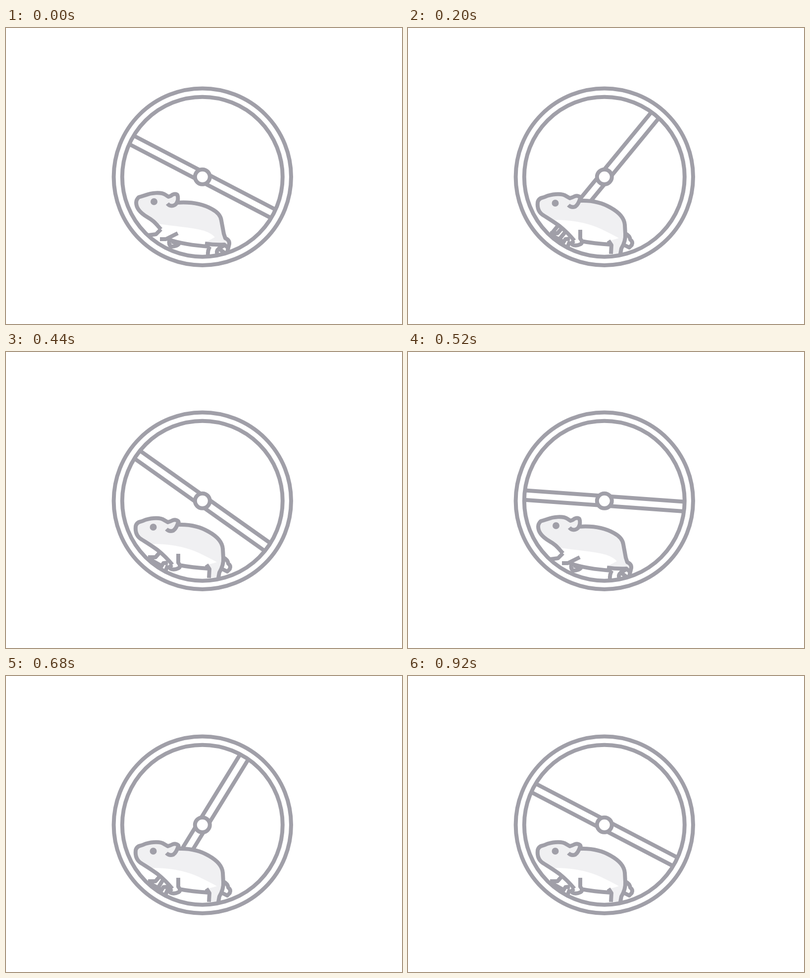
An HTML page with a canvas that plays this animation: 800 px wide and 600 px high, repeating every 0.96 s.

```html
<!DOCTYPE html>
<html lang="en">
<head>
<meta charset="utf-8">
<title>Hamster wheel</title>
<style>
  html, body { margin: 0; width: 100%; height: 100%; overflow: hidden; background: #fff; }
  canvas { display: block; }
</style>
</head>
<body>
<canvas id="stage" width="800" height="600"></canvas>
<script>
const ctx = document.getElementById('stage').getContext('2d');
const LINE = '#a09fa8', FUR = '#f0f0f2', WHITE = '#fff';
const HUB = { x: 396.8, y: 301.7 };
const STEP_MS = 40, STEPS = 24, TURN_STEPS = 23, POSE_STEPS = 2;

// outline: chin, head, ear, back and rump; base closes it for the fill
const stretched = {
  eye: [299, 352],
  outline: `M313 408C302 396 299 391 285 383C270 374 263 364 263 354Q263 348 268 343
    Q275 341 281 339C294 334 313 332 322 338L328 342Q333 341 336 338Q342 335 346 338
    Q348 342 347 350L346 354C376 352 400 358 416 367C429 374 434 382 435 390
    L440 417L443 426Q452 430 451 438L447 454`,
  base: 'L441 441L411 443Q360 440 330 429L316 421Z',
  belly: 'M301 396C340 402 375 404 400 411Q415 416 422 424L402 435L411 443Q360 440 330 429L315 420Z',
  marks: `M347 349Q345 358 338 360Q331 362 326 356
    M313 408L303 418L288 420 M347 416L323 428L311 428
    M330 430Q328 440 334 443Q345 443 349 438L335 433
    M329 429C350 436 380 441 411 443 M402 437Q422 440 441 439L449 446
    M412 443Q407 450 408 462 M440 441L430 447Q424 452 427 459 M431 448L442 456`
};

const reaching = {
  eye: [303.5, 355.5],
  outline: `M323 415C315 405 306 399 296 393C280 384 267 374 267 360Q268 353 273 347
    Q280 345 286 342C300 337 317 336 325 343L331 347Q337 345 341 342Q347 339 350 341
    Q353 345 352 351L350 355C379 353 401 361 417 371C433 380 441 389 442 400
    Q444 412 447 425Q448 438 444 454`,
  base: 'L431 449L418 443Q370 439 340 431L325 424Z',
  belly: 'M304 395C340 402 372 404 397 413Q418 421 428 430L409 436L418 443Q370 439 340 431L324 420Z',
  marks: `M352 349Q349 360 343 363Q336 365 331 360
    M323 413L321 427L311 432 M354 416L334 432L327 444
    M337 430C360 437 390 441 420 443 M407 435L420 442L432 447
    M419 441L430 449L430 458`
};

const gathered = {
  eye: [297.5, 355],
  outline: `M336 431Q322 414 307 402C295 393 285 387 274 380C262 373 261 362 262 353
    Q263 348 268 345Q276 343 282 340C296 336 312 335 320 341L327 345Q333 343 337 341
    Q343 339 348 343Q350 347 348 350C374 349 394 355 409 364C427 374 437 386 438 399
    L439 417Q440 432 431 447L429 458`,
  base: 'L411 457L411 441L350 432Z',
  belly: 'M295 389C335 389 365 396 389 407Q412 418 426 426L405 432L411 441Q375 437 350 432L336 431Z',
  marks: `M348 345Q344 358 338 362Q330 365 324 359
    M336 431Q330 434 332 439Q339 443 349 438Q354 434 348 427L348 409
    M350 432Q376 437 409 439 M405 431L411 440L410 458
    M440 417Q448 421 449 429Q455 433 452 440L447 445L437 440
    M287 416L302 416L310 407 M292 421L315 434 M313 436L318 428L327 427 M323 442L327 432`
};

const poses = [stretched, reaching, gathered].map(p => ({
  eye: p.eye,
  outline: new Path2D(p.outline),
  fur: new Path2D(p.outline + p.base),
  belly: new Path2D(p.belly),
  marks: new Path2D(p.marks)
}));

function fill(path, color) {
  ctx.fillStyle = color;
  ctx.fill(path);
}

function circle(x, y, r) {
  const path = new Path2D();
  path.arc(x, y, r, 0, Math.PI * 2);
  return path;
}

function drawSpoke(angle) {
  ctx.save();
  ctx.translate(HUB.x, HUB.y);
  ctx.rotate(angle);
  for (const y of [-9.7, 9.7]) {
    ctx.beginPath();
    ctx.moveTo(-161, y);
    ctx.lineTo(161, y);
    ctx.stroke();
  }
  ctx.restore();
  const hub = circle(HUB.x, HUB.y, 15);
  fill(hub, WHITE);
  ctx.stroke(hub);
}

function drawHamster(pose) {
  fill(pose.fur, FUR);
  fill(pose.belly, WHITE);
  ctx.stroke(pose.outline);
  ctx.stroke(pose.marks);
  fill(circle(...pose.eye, 7), LINE);
}

function drawRim() {
  ctx.save();
  ctx.lineWidth = 10;
  ctx.strokeStyle = WHITE;
  ctx.stroke(circle(HUB.x, HUB.y, 170.5));
  ctx.restore();
  for (const r of [162, 179.2]) ctx.stroke(circle(HUB.x, HUB.y, r));
}

function draw(now) {
  const step = Math.floor(now / STEP_MS) % STEPS;
  const angle = (27.6 - 360 * step / TURN_STEPS) * Math.PI / 180;
  fill(circle(400, 300, 600), WHITE);
  ctx.strokeStyle = LINE;
  ctx.lineWidth = 8;
  ctx.lineJoin = 'round';
  drawSpoke(angle);
  drawHamster(poses[Math.floor(step / POSE_STEPS) % poses.length]);
  drawRim();
}

const start = performance.now();
function tick() {
  draw(performance.now() - start);
  requestAnimationFrame(tick);
}
tick();
</script>
</body>
</html>
```
